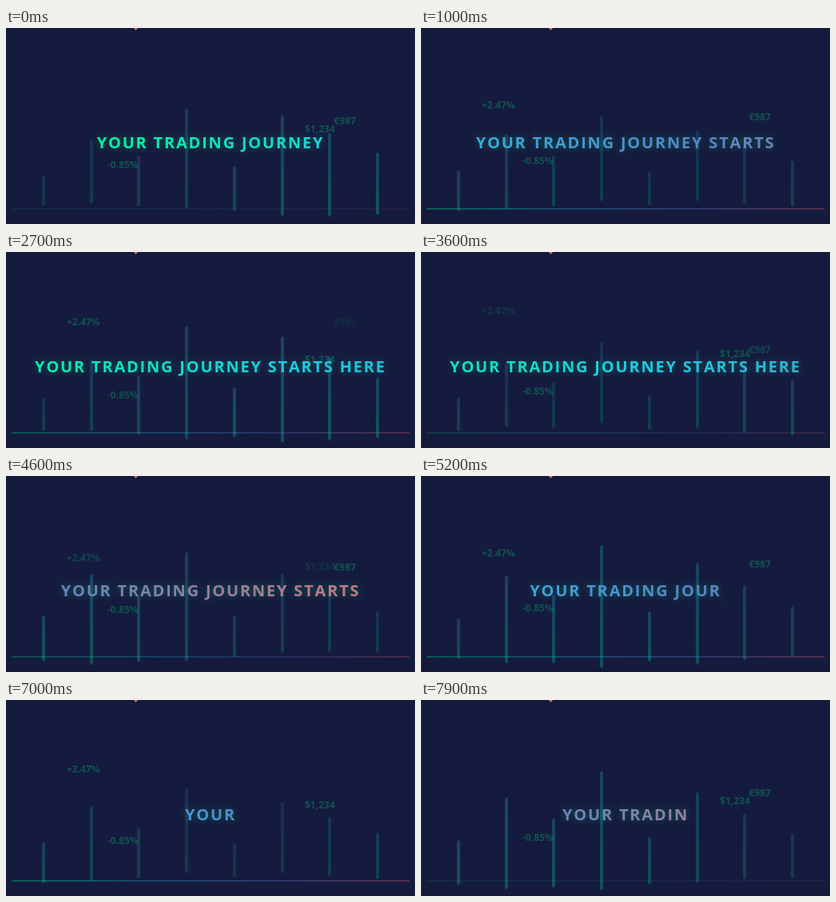
An HTML page that plays this animation: 512x246 px, repeating every 8 s.

```html
<!DOCTYPE html>
<html lang="en">
<head>
<meta charset="utf-8">
<title>Trading journey</title>
<style>
  html, body { margin: 0; width: 100%; height: 100%; overflow: hidden; }
  body {
    position: relative;
    background: #151b3e;
    font-family: "Open Sans", "Noto Sans", sans-serif;
    font-weight: 700;
  }
  #stage { position: absolute; inset: 0; width: 512px; height: 246px; overflow: hidden; }
  #stage * { position: absolute; animation-play-state: paused; }

  .edge { left: 0; top: 244px; width: 512px; height: 2px; background: #131836; }
  .tip {
    left: 160px; top: 0; width: 5px; height: 3px;
    background: #d9774f;
    clip-path: polygon(0 0, 100% 0, 50% 100%);
  }

  .line {
    left: 7px; top: 226px; width: 498px; height: 2px;
    background: linear-gradient(90deg, #00ff88, #20c8f0, #667eea, #ff6b6b);
    animation: pulse 2s ease-in-out infinite;
  }
  @keyframes pulse {
    0%, 100% { opacity: .07; }
    50% { opacity: .28; }
  }

  .bar {
    bottom: 18.5px; width: 4px; border-radius: 2px;
    background: linear-gradient(to top, #08ee96, #2cb4dc);
    animation: stretch 3s ease-in-out infinite;
  }
  @keyframes stretch {
    0%, 100% { transform: scaleY(.8); opacity: .15; }
    50% { transform: scaleY(1.2); opacity: .27; }
  }

  .num {
    font-size: 12px; line-height: 12px; white-space: nowrap;
    color: #00ff88;
    animation: rise 4s ease-in-out infinite;
  }
  @keyframes rise {
    0% { transform: translateY(34px); opacity: 0; }
    22% { transform: translateY(5.5px); opacity: .25; }
    80% { transform: translateY(-5.5px); opacity: .25; }
    100% { transform: translateY(-30px); opacity: 0; }
  }

  #title {
    left: 0; top: 130px; width: 512px; height: 28px;
    font-size: 20px; line-height: 28px; letter-spacing: 1.8px;
    font-kerning: none; text-align: center; white-space: nowrap;
    color: transparent;
    background: linear-gradient(45deg, #00ff88, #20c8f0, #6078d0, #f06c70) 0 50% / 300% 100%;
    -webkit-background-clip: text;
    background-clip: text;
    text-shadow: 0 0 10px rgba(0, 255, 136, .3);
    animation: shift 3s ease-in-out -2.9s infinite;
  }
  @keyframes shift {
    0%, 100% { background-position: 0 50%; }
    50% { background-position: 100% 50%; }
  }
</style>
</head>
<body>
<div id="stage">
  <div class="edge"></div>
  <div class="tip"></div>
  <div class="line"></div>
  <div class="num" style="left:76px;top:86px;animation-delay:-4s">+2.47%</div>
  <div class="num" style="left:374px;top:126px;animation-delay:-3s">$1,234</div>
  <div class="num" style="left:127px;top:166px;animation-delay:-2s">-0.85%</div>
  <div class="num" style="left:410.5px;top:106px;animation-delay:-1s">€987</div>
  <div id="title"></div>
</div>
<script>
  const LOOP = 8000;
  const PHRASE = "YOUR TRADING JOURNEY STARTS HERE";
  const TYPE = 150, ERASE = 57, ERASE_AT = 4300;
  const RETYPE_AT = ERASE_AT + PHRASE.length * ERASE;

  const stage = document.getElementById("stage");
  const title = document.getElementById("title");

  [48, 96, 72, 128, 53, 111, 88, 65].forEach((height, i) => {
    const bar = document.createElement("div");
    bar.className = "bar";
    bar.style.left = 45 + i * 59.7 + "px";
    bar.style.height = height + "px";
    bar.style.animationDelay = 0.1 + 0.2 * i - 3 + "s";
    stage.insertBefore(bar, title);
  });

  // Number of letters on show: finish typing, hold, erase, type again.
  function letters(t) {
    if (t < ERASE_AT) return Math.min(PHRASE.length, 20 + Math.floor((t + 60) / TYPE));
    if (t < RETYPE_AT) return PHRASE.length - Math.floor((t - ERASE_AT) / ERASE);
    return Math.floor((t - RETYPE_AT) / TYPE);
  }

  const animations = document.getAnimations();
  const start = performance.now();

  function draw() {
    const t = (performance.now() - start) % LOOP;
    animations.forEach(a => { a.currentTime = t; });
    const text = PHRASE.slice(0, letters(t)).trimEnd();
    if (title.textContent !== text) title.textContent = text;
    requestAnimationFrame(draw);
  }
  draw();
</script>
</body>
</html>
```
